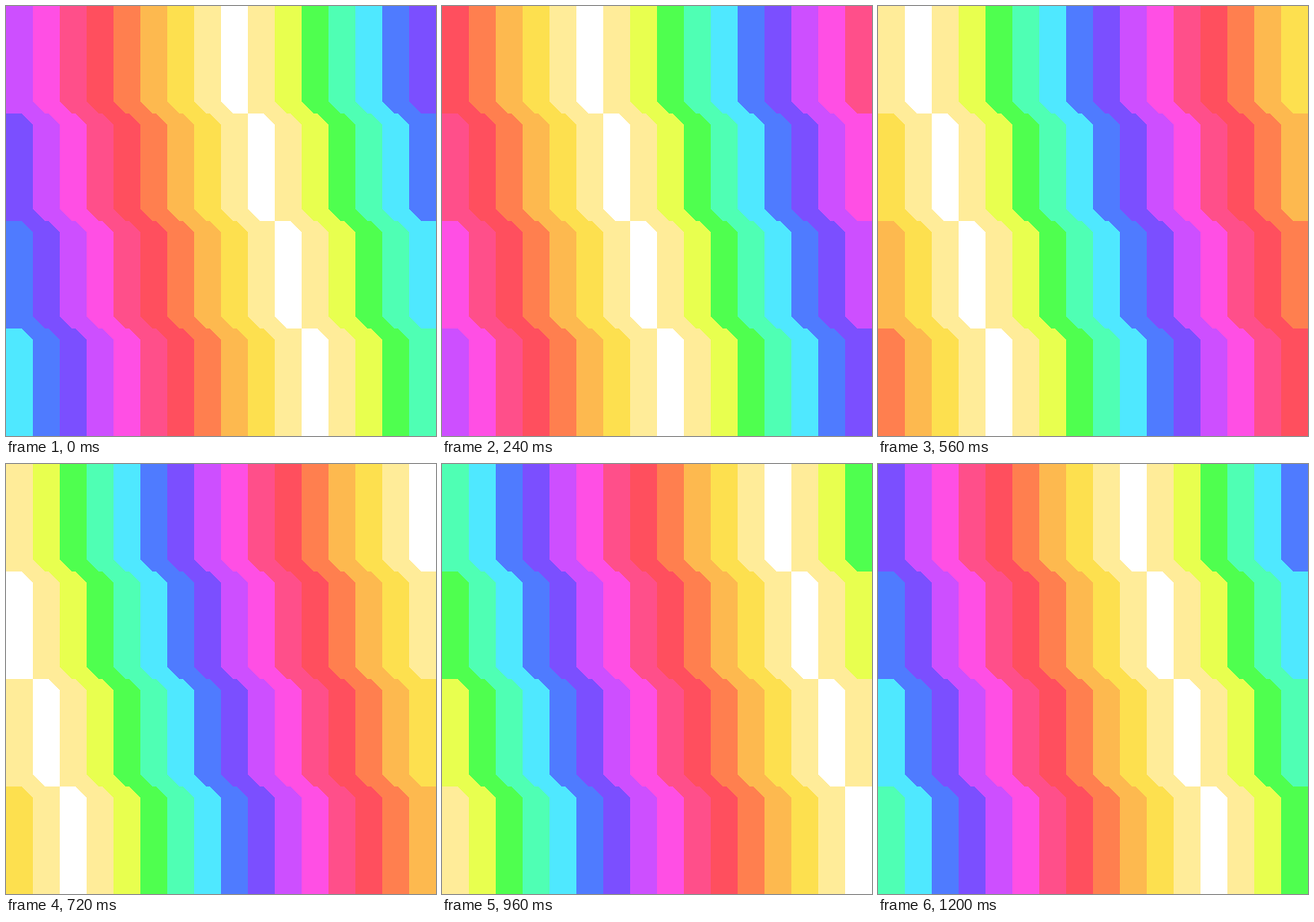
Animation of 480 by 480 pixels, one loop 1280 ms. Source, as an HTML page:

```html
<!DOCTYPE html>
<html lang="en">
<head>
<meta charset="utf-8">
<title>Rainbow steps</title>
<style>
  html, body { margin: 0; width: 100%; height: 100%; overflow: hidden; }
  svg { display: block; width: 100%; height: 100%; }
</style>
</head>
<body>
<svg id="stage" viewBox="0 0 480 480" shape-rendering="crispEdges"></svg>
<script>
const COLORS = [
  '#cd4fff', '#ff4fe4', '#ff4f8a', '#ff4f5e', '#ff7f4f', '#fdb94f', '#fde04f', '#ffec99',
  '#ffffff', '#ffec99', '#e8ff4f', '#4fff4f', '#4fffb4', '#4fe8ff', '#4f7bff', '#7b4fff'
];
const WHITE = 8;
const COL = 30, ROW = 120, ROWS = 4, SIZE = 480, CUT = 13;
const STEP_MS = 80;

const stage = document.getElementById('stage');
const bands = [];
for (let col = 1 - ROWS; col < SIZE / COL; col++) {
  const path = document.createElementNS('http://www.w3.org/2000/svg', 'path');
  stage.append(path);
  bands.push({ col, path });
}

// Left edge of a band; each band fills on to the right and the next covers it.
function bandPath(col, color) {
  const points = [[col * COL, 0]];
  for (let row = 1; row < ROWS; row++) {
    const x = (col + row - 1) * COL, y = row * ROW;
    // The corners where white touches itself diagonally stay square.
    const upper = x > 0 && color !== WHITE + 1 ? CUT : 0;
    const lower = x + COL < SIZE && color !== WHITE ? CUT : 0;
    points.push([x, y - upper], [x + upper, y], [x + COL - lower, y], [x + COL, y + lower]);
  }
  points.push([(col + ROWS - 1) * COL, SIZE], [SIZE + ROWS * COL, SIZE], [SIZE + ROWS * COL, 0]);
  return 'M' + points.join('L') + 'Z';
}

let shown = -1;
function draw(time) {
  const step = Math.floor(time / STEP_MS) % COLORS.length;
  if (step === shown) return;
  shown = step;
  for (const { col, path } of bands) {
    const color = (col + step + COLORS.length) % COLORS.length;
    path.setAttribute('d', bandPath(col, color));
    path.setAttribute('fill', COLORS[color]);
  }
}

const start = performance.now();
function tick() {
  draw(performance.now() - start);
  requestAnimationFrame(tick);
}
tick();
</script>
</body>
</html>
```
